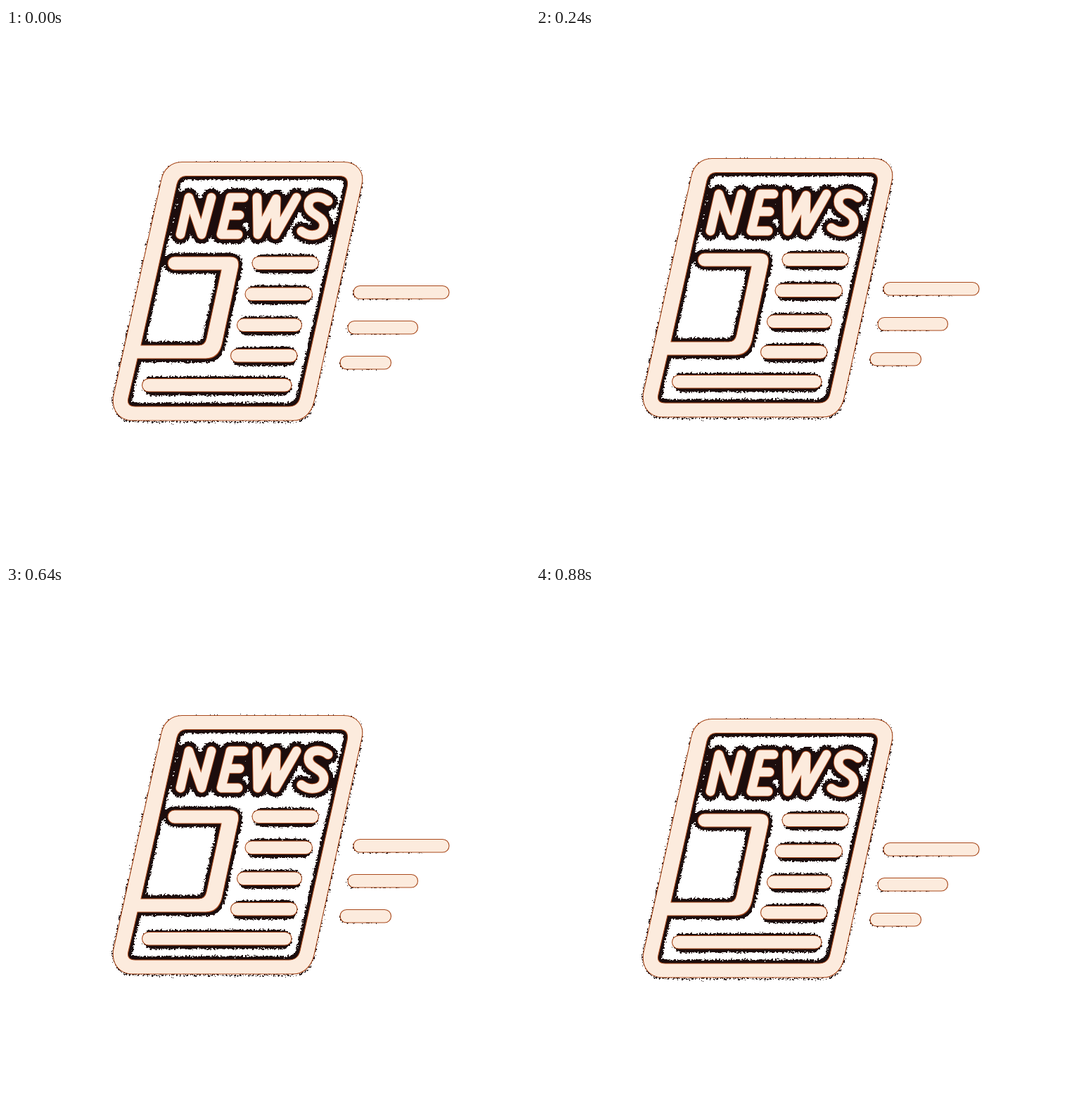
Recreate the animation shown at these times as an HTML page. Size 745 by 752 pixels, loop 0.96 s.

```html
<!DOCTYPE html>
<html lang="en">
<head>
<meta charset="utf-8">
<title>News</title>
<style>
  html, body { margin: 0; width: 100%; height: 100%; overflow: hidden; background: #fff; }
  svg { display: block; }
  .face { fill: #fcebdd; stroke: #a94a1d; stroke-width: 1.1; }
  .shadow { fill: none; stroke: #1b0f09; stroke-linejoin: round; stroke-linecap: round; }
  .letters { fill: none; stroke-linejoin: round; stroke-linecap: round; }
</style>
</head>
<body>
<svg id="icon" width="745" height="752" viewBox="0 0 745 752" role="img" aria-label="NEWS">
  <defs>
    <!-- Soft shadow plus noise, cut at a hard threshold -->
    <filter id="ragged" filterUnits="userSpaceOnUse" x="130" y="170" width="520" height="410">
      <feGaussianBlur in="SourceAlpha" stdDeviation="2" result="soft"/>
      <feTurbulence type="fractalNoise" baseFrequency=".4" numOctaves="2" seed="4" result="noise"/>
      <feComposite in="soft" in2="noise" operator="arithmetic" k2="1" k3="1.2" k4="-.6"/>
      <feComponentTransfer result="mask"><feFuncA type="linear" slope="30" intercept="-15"/></feComponentTransfer>
      <feFlood flood-color="#1b0f09"/>
      <feComposite in2="mask" operator="in"/>
    </filter>
    <path id="outer" d="M250 190.5H480C498 190.5 510 204 506 222L438 531C434 547 424 558 408 558H180C162 558 149 544 153 522L221 215C224 201 235 190.5 250 190.5Z"/>
    <path id="inner" d="M256 210.5H474Q488 210.5 485 226L418 525Q415 538 402 538H184Q171 538 174 526L187 470H284C297 470 304 462 307 450L330 342Q334 325 318 325H239.500a9.500 9.500 0 0 0 0 19H306L285 441Q283 451 274 451H192L243 222Q246 210.500 256 210.500Z"/>
    <path id="news" d="M248 293.500L260 241L278 293.500L292 241M338 241H319L306 293.500H330M313 266H332M357 241L358 293.500L384 243L383 293.500L413 241M458 246C448 238 430 238 430 252C430 266 452 266 452 280C452 296 432 298 420 289"/>
  </defs>
  <g class="shadow" filter="url(#ragged)">
    <use href="#outer" y="1.5" stroke-width="3"/>
    <use href="#inner" stroke-width="11"/>
    <use href="#news" stroke-width="27"/>
    <g id="barShadows" fill="#1b0f09" stroke="none"></g>
  </g>
  <path id="paper" class="face" fill-rule="evenodd"/>
  <g id="bars" class="face"></g>
  <g class="letters">
    <use href="#news" stroke="#a94a1d" stroke-width="14.5"/>
    <use href="#news" stroke="#fcebdd" stroke-width="12.5"/>
  </g>
</svg>
<script>
const byId = id => document.getElementById(id);
const BAR_HEIGHT = 18.5;

function addRect(parent, x, y, width, height, rx) {
  const rect = document.createElementNS('http://www.w3.org/2000/svg', 'rect');
  for (const [name, value] of Object.entries({ x, y, width, height, rx })) rect.setAttribute(name, value);
  parent.append(rect);
}

function addBar(left, right, top, printed) {
  const width = right - left;
  addRect(byId('bars'), left, top, width, BAR_HEIGHT, BAR_HEIGHT / 2);
  if (printed) addRect(byId('barShadows'), left + 1, top - 3.5, width - 1, BAR_HEIGHT + 9, 13);
  else addRect(byId('barShadows'), left - 1, top + 2, width * 0.8, BAR_HEIGHT - 1.5, 9);
}

byId('paper').setAttribute('d', byId('outer').getAttribute('d') + byId('inner').getAttribute('d'));

[[350, 444.5, 325], [340, 435.5, 369], [328.5, 420.5, 413], [319.5, 414, 456.5], [193.5, 406, 498.5]]
  .forEach(bar => addBar(...bar, true));
[[494, 630, 366.5], [486, 585.5, 416.5], [475, 547.5, 466.5]]
  .forEach(bar => addBar(...bar, false));

// Four steps up, a pause, four steps down.
function draw(now) {
  const t = now % 960;
  const step = t < 640 ? Math.min(4, Math.floor(t / 80)) : 3 - Math.floor((t - 640) / 80);
  byId('icon').style.transform = `translateY(${-Math.round(step * 1.75)}px)`;
}

const start = performance.now();
function tick() {
  draw(performance.now() - start);
  requestAnimationFrame(tick);
}
tick();
</script>
</body>
</html>
```
